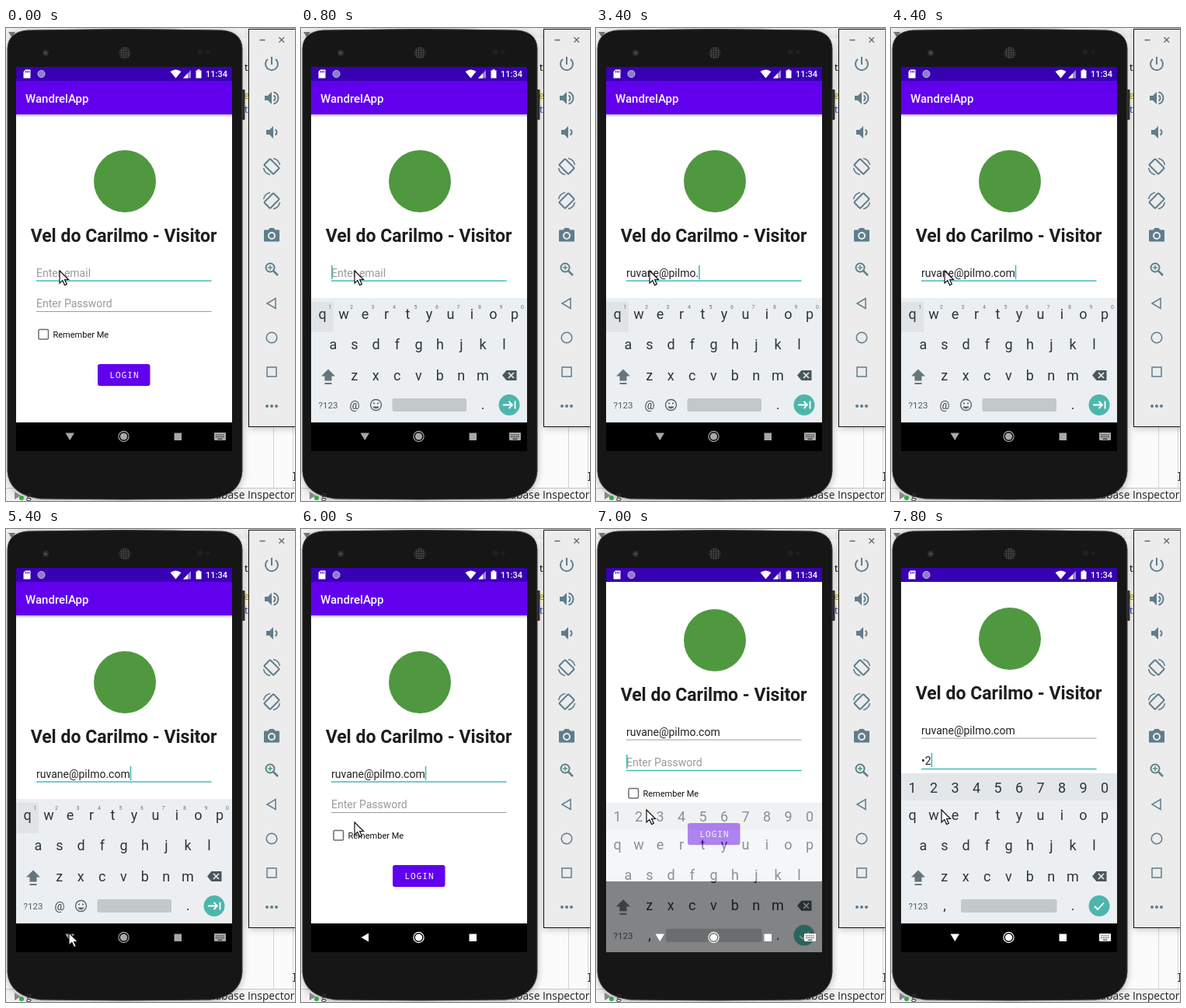
Write an HTML page that moves like this. It is 372 px wide and 608 px high and loops after 8 s.

```html
<!DOCTYPE html>
<html lang="en">
<head>
<meta charset="utf-8">
<title>Login form</title>
<style>
  html, body { margin: 0; width: 100%; height: 100%; overflow: hidden; background: #f8f8f8; }
  svg { display: block; width: 100%; height: 100%; }
  text { font-family: Roboto, sans-serif; white-space: pre; }
  .ui { font-family: "Open Sans", "Noto Sans", sans-serif; }
  .mono { font-family: "Noto Sans Mono", "DejaVu Sans Mono", monospace; }
  .mid { text-anchor: middle; }
  .key { font-size: 18px; fill: #2b363b; text-anchor: middle; }
  .line { fill: none; stroke: #5f7d8c; stroke-width: 2; }
  .thin { stroke-width: 1.5; }
  .bold { stroke-width: 2.5; }
  .solid { fill: #5f7d8c; }
  .field { font-size: 14px; }
</style>
</head>
<body>
<svg viewBox="0 0 372 608" xmlns="http://www.w3.org/2000/svg">
  <defs>
    <filter id="shadow" x="-20%" y="-10%" width="140%" height="120%">
      <feDropShadow dx="0" dy="2" stdDeviation="5" flood-opacity=".28"/>
    </filter>
    <linearGradient id="fade" x2="0" y2="1">
      <stop stop-opacity=".25"/><stop offset="1" stop-opacity="0"/>
    </linearGradient>
    <pattern id="mesh" width="3" height="3" patternUnits="userSpaceOnUse">
      <rect width="3" height="3" fill="#222"/><circle cx="1.500" cy="1.500" r=".9" fill="#555"/>
    </pattern>
    <clipPath id="screen"><rect x="13" y="50" width="278" height="494"/></clipPath>
  </defs>

  <!-- desktop behind the emulator -->
  <rect width="372" height="608" fill="#fbfbfb"/>
  <rect width="372" height="13" fill="#efefef"/>
  <path d="M3 5h9l-4.500 7z" fill="#777"/>
  <path d="M20 5l6 4-6 4z" fill="#999"/>
  <path d="M344.500 513V591M369.500 513V591" stroke="#d5d5d5"/>
  <path d="M0 591.500H372" stroke="#c4c4c4"/>
  <rect y="592" width="372" height="16" fill="#f3f3f3"/>
  <text class="ui" x="369" y="580" font-size="13">]</text>

  <rect x="313" y="3" width="70" height="509" filter="url(#shadow)"/>
  <g id="phone"></g>
  <g id="panel"></g>
  <g clip-path="url(#screen)">
    <rect x="13" y="50" width="278" height="494"/>
    <g id="page"></g>
    <g id="status"></g>
    <g id="keyboard"></g>
    <g id="nav"></g>
  </g>
  <path id="mouse" d="M0 0V16L3.800 12.600L6.600 18.600L9.300 17.300L6.600 11.500H11.500Z" fill="#fff" stroke="#111" stroke-width="1.200"/>
</svg>

<script>
const LOOP = 8000, STEP = 200;
const EMAIL = 'ruvane@pilmo.com';
const TEAL = '#3fbcb8', GREY = '#9b9b9b';
const FOCUS = 6800; // password field gets the focus
const $ = id => document.getElementById(id);

const text = (x, y, s, attrs = '') => `<text x="${x}" y="${y}" ${attrs}>${s}</text>`;
const keys = (s, x, y, attrs = 'class="key"') =>
  [...s].map((c, i) => text(x + 27.5 * i, y, c, attrs)).join('');
const at = (x, y, body) => `<g transform="translate(${x} ${y})">${body}</g>`;

const linear = u => u;
const smooth = u => u * u * (3 - 2 * u);

// Interpolation through [time, value] points
function track(t, points, ease = linear) {
  let [t0, v0] = points[0];
  for (const [t1, v1] of points) {
    if (t < t1) return v0 + (v1 - v0) * ease(Math.max(0, t - t0) / (t1 - t0 || 1));
    [t0, v0] = [t1, v1];
  }
  return v0;
}

$('phone').innerHTML = `
  ${text(371.5, 605, 'Database Inspector', 'class="ui" font-size="13.8" text-anchor="end" fill="#222"')}
  ${text(307, 55, 't', 'class="ui" font-size="13"')}
  <rect x="305" y="79" width="8" height="16" fill="#f3f0c4"/>
  ${text(306, 91, 'e', 'class="ui" font-size="13" fill="#8a8420"')}
  ${text(307, 109, 't', 'class="ui" font-size="13" fill="#2a3fb0"')}
  <rect x="303" y="79" width="4.500" height="39" rx="1" fill="#333"/>
  <path d="M2 26Q3 5 28 3Q152 0 278 3Q303 5 304 26V570Q302 600 264 605Q152 607 44 605Q4 600 2 570Z"
    fill="#191919" stroke="#3a3a3a" filter="url(#shadow)"/>
  <circle cx="51" cy="32" r="4" fill="#2d2d2f"/><circle cx="51" cy="32" r="1.600" fill="#55555c"/>
  <circle cx="153" cy="32" r="7.500" fill="url(#mesh)"/>
  <circle cx="250" cy="31" r="3.500" fill="#202020"/><circle cx="260" cy="31" r="2.500" fill="#202020"/>
  <path d="M11 596l8 5-8 5z" fill="#888"/>
  <circle cx="20" cy="604" r="3" fill="#39a845"/>
  ${text(26, 605, 'g', 'class="ui" font-size="12.5" fill="#333"')}`;

const rotate = flip => `<g transform="scale(${flip} 1)">
  <rect x="-5.500" y="-8.500" width="11" height="17" rx="1" transform="rotate(-45)" class="line"/>
  <path d="M2-10.500Q9-9 10.500-2M-2 10.500Q-9 9-10.500 2" class="line thin"/></g>`;

const speaker = '<path d="M-9-3h4l5-5v16l-5-5h-4z" class="solid"/><path d="M2.500-3.500A4 4 0 0 1 2.500 3.500" class="line"/>';

const tools = [
  '<path d="M0-9V1M-5-6A8 8 0 1 0 5-6" class="line"/>',
  speaker + '<path d="M2.500-7.500A7.700 7.700 0 0 1 2.500 7.500" class="line"/>',
  `<g transform="translate(2 0)">${speaker}</g>`,
  rotate(1),
  rotate(-1),
  `<path d="M-9.500-6h5l2-2.500h5l2 2.500h5v14h-19z" class="solid" stroke="#5f7d8c" stroke-linejoin="round"/>
   <circle cy="1" r="4" class="solid" stroke="#ececec" stroke-width="2"/>`,
  `<circle cx="-2" cy="-2" r="5.500" class="line"/><path d="M2 2L8 8" class="line bold"/>
   <path d="M-5-2h6M-2-5v6" class="thin" stroke="#4c9c78"/>`,
  '<path d="M5-6.500V6.500L-6 0Z" class="line thin"/>',
  '<circle r="6.800" class="line thin"/>',
  '<rect x="-6" y="-6" width="12" height="12" class="line thin"/>',
  [-6, 0, 6].map(x => `<circle cx="${x}" r="2" class="solid"/>`).join('')
];

$('panel').innerHTML = `
  <rect x="312.500" y="1.500" width="70" height="511" fill="#ececed" stroke="#111"/>
  <path d="M326.500 15.500h7M351.500 12l6.500 6.500m0-6.500l-6.500 6.500" stroke="#666" stroke-width="1.300"/>
  ${tools.map((icon, i) => at(342, 46 + 44 * i, icon)).join('')}`;

$('page').innerHTML = `
  <rect x="13" y="68" width="278" height="439" fill="#fff"/>
  <rect x="13" y="68" width="278" height="43" fill="#6200ee"/>
  <rect x="13" y="111" width="278" height="4" fill="url(#fade)"/>
  ${text(25, 96, 'WandrelApp', 'font-size="15" font-weight="500" fill="#fff"')}
  <circle cx="153" cy="197" r="40" fill="#4f983f"/>
  ${text(151.5, 275, 'Vel do Carilmo - Visitor', 'class="mid" font-size="23" font-weight="700" fill="#1d1d1f"')}
  <text id="email" class="field" x="39" y="320"></text>
  <path id="emailLine" d="M39 325H264.500"/>
  <text id="pass" class="field" x="39" y="358.500"></text>
  <path id="passLine" d="M39 364.500H264.500"/>
  <path id="caret" stroke="${TEAL}" stroke-width="1.600"/>
  <rect x="42" y="387.500" width="12.500" height="12.500" rx="1.500" fill="none" stroke="#6c6c6c" stroke-width="1.500"/>
  ${text(60.5, 397.5, 'Remember Me', 'font-size="11" fill="#111"')}
  <rect x="119" y="457" width="65.500" height="5" rx="2" fill="url(#fade)"/>
  <rect x="118" y="432" width="67.500" height="28" rx="3" fill="#6200ee"/>
  ${text(133.5, 450, 'LOGIN', 'class="mono" font-size="11" letter-spacing="1" fill="#fff"')}`;

$('status').innerHTML = `
  <rect x="13" y="50" width="278" height="18" fill="#3700b3"/>
  <path d="M25 53.500h6.500v11h-9V56z" fill="#fff"/>
  <path d="M25.500 55v2.500M27.500 55v2.500M29.500 55v2.500" stroke="#3700b3"/>
  <circle cx="45.500" cy="59" r="4.500" fill="#8f79cc" stroke="#c9bcec"/>
  <path d="M211.500 56Q218.500 51 225.500 56L218.500 64.500Z" fill="#fff"/>
  <path d="M228 64.500L238 54V64.500Z" fill="#9f86db"/><path d="M228 64.500L234 58.200V64.500Z" fill="#fff"/>
  <path d="M244.500 54.500h2v-1.300h3v1.300h2v10h-7z" fill="#fff"/>
  ${text(257, 63, '11:34', 'font-size="11" font-weight="500" fill="#fff"')}`;

$('keyboard').innerHTML = `
  <rect id="board" x="13" width="278" fill="#eceff1"/>
  <g id="mailKeys">
    <rect x="13" y="352" width="29" height="39" fill="#e1e4e6"/>
    ${keys('1234567890', 37.5, 361, 'class="mid" font-size="7" fill="#68757b"')}
    ${text(69, 490, '@', 'class="mid" font-size="14.5" fill="#37454b"')}
    <circle cx="96.500" cy="484.500" r="7" fill="none" stroke="#55646b" stroke-width="1.400"/>
    <path d="M92.500 486.500a4.200 4 0 0 0 8 0z" fill="#55646b"/>
    <circle cx="94" cy="482.500" r="1.100" fill="#55646b"/><circle cx="99" cy="482.500" r="1.100" fill="#55646b"/>
  </g>
  <g id="passKeys">
    <rect x="13" y="314" width="278" height="35" fill="#e4e7ea"/>
    ${keys('1234567890', 27.5, 338.5)}
    ${text(69, 490, ',', 'class="key"')}
  </g>
  ${keys('qwertyuiop', 27.5, 374)}
  ${keys('asdfghjkl', 41.5, 413)}
  ${keys('zxcvbnm', 68.8, 452.5)}
  <path d="M35 438.500l9 9h-4.500v6h-9v-6H26z" fill="#66757c"/>
  <path d="M30.500 457h9" stroke="#66757c" stroke-width="2"/>
  <path d="M259 446.500l5.500-6.500H277.500V453H264.500z" fill="#4a585e"/>
  <path d="M267 443l7 7m0-7l-7 7" stroke="#eceff1" stroke-width="1.600"/>
  ${text(35, 489, '?123', 'class="mid" font-size="11.5" fill="#4f5f66"')}
  <rect id="space" y="476" height="17" rx="2.500" fill="#c3c8cb"/>
  ${text(234, 490, '.', 'class="key"')}
  <circle cx="268" cy="484.500" r="13.500" fill="#4db6ac"/>
  <path id="action" fill="none" stroke="#fff" stroke-width="1.800"/>`;

$('nav').innerHTML = `
  <path id="back"/>
  <circle cx="151.500" cy="525" r="4.600"/>
  <circle cx="151.500" cy="525" r="6.600" fill="none" stroke="currentColor" stroke-width="1.200"/>
  <rect x="216.500" y="520.500" width="9.500" height="9.500"/>
  <g id="switcher">
    <rect x="268" y="520" width="15" height="10" rx="1"/>
    <path d="M270 523h11M270 525.500h11" stroke="#111" stroke-dasharray="1.300 1"/>
    <path d="M272.500 528.200h6" stroke="#111"/>
  </g>`;

const show = (id, on) => $(id).style.display = on ? '' : 'none';
const set = (id, attrs) => { for (const k in attrs) $(id).setAttribute(k, attrs[k]); };

function field(id, value, hint, focused) {
  $(id).textContent = value || hint;
  set(id, { fill: value ? '#222' : '#9a9a9a' });
  set(id + 'Line', { stroke: focused ? TEAL : GREY, 'stroke-width': focused ? 1.4 : 1 });
}

// The keyboard fades in over two steps after a field gets the focus
const fadeIn = dt => track(dt, [[0, 0], [200, .55], [400, 1]]);

function render(t) {
  const onPass = t >= FOCUS;
  const typed = Math.floor(track(t, [[700, 0], [1800, 6], [3400, 13], [4000, 16]]) + 1e-6);
  const secret = t >= 7800 ? '•2' : t >= 7600 ? '1' : '';
  field('email', EMAIL.slice(0, typed), 'Enter email', !onPass);
  field('pass', secret, 'Enter Password', onPass);

  const typing = (t >= 700 && t <= 4000) || t >= 7400;
  const value = onPass ? secret : typed;
  const end = 39.8 + (value ? $(onPass ? 'pass' : 'email').getComputedTextLength() : 0);
  const phase = (onPass ? t - FOCUS : t) % 1000;
  show('caret', t > 0 && (typing || phase < 500));
  set('caret', { d: `M${end} ${onPass ? 344 : 305}v18` });

  const scroll = track(t, [[FOCUS, 0], [FOCUS + 200, 54], [FOCUS + 400, 56]]);
  set('page', { transform: `translate(0 ${-scroll})` });

  const open = onPass ? fadeIn(t - FOCUS) : Math.min(fadeIn(t), track(t, [[5400, 1], [5800, 0]]));
  const top = onPass ? 314 : 347;
  set('keyboard', { opacity: open, transform: `translate(0 ${84 * (1 - open)})` });
  set('board', { y: top, height: 507 - top });
  set('space', { x: onPass ? 90 : 117.5, width: onPass ? 123.5 : 95.5 });
  set('action', { d: onPass ? 'M262 485l4 4 8-8.500' : 'M260 484.500h12m-4.500-4.500l4.500 4.500-4.500 4.500M275.500 479.500v10' });
  show('mailKeys', !onPass);
  show('passKeys', onPass);

  const closed = t >= 5600 && !onPass;
  const tint = t < 5600 ? '#a8a8a8' : '#fff';
  set('nav', { fill: tint, color: tint });
  set('back', { d: closed ? 'M87 519.500v11l-9.500-5.500z' : 'M76.500 520.500h11.500l-5.800 9.500z' });
  show('switcher', !closed);

  const x = track(t, [[4400, 69], [5200, 81], [5600, 81], [6000, 69], [6400, 65]], smooth);
  const y = track(t, [[4400, 312], [5200, 519], [5600, 519], [6000, 377], [6400, 361]], smooth);
  set('mouse', { transform: `translate(${x} ${y})` });
}

function tick() {
  const t = performance.now() % LOOP;
  render(Math.floor(t / STEP) * STEP);
  requestAnimationFrame(tick);
}
tick();
</script>
</body>
</html>
```
